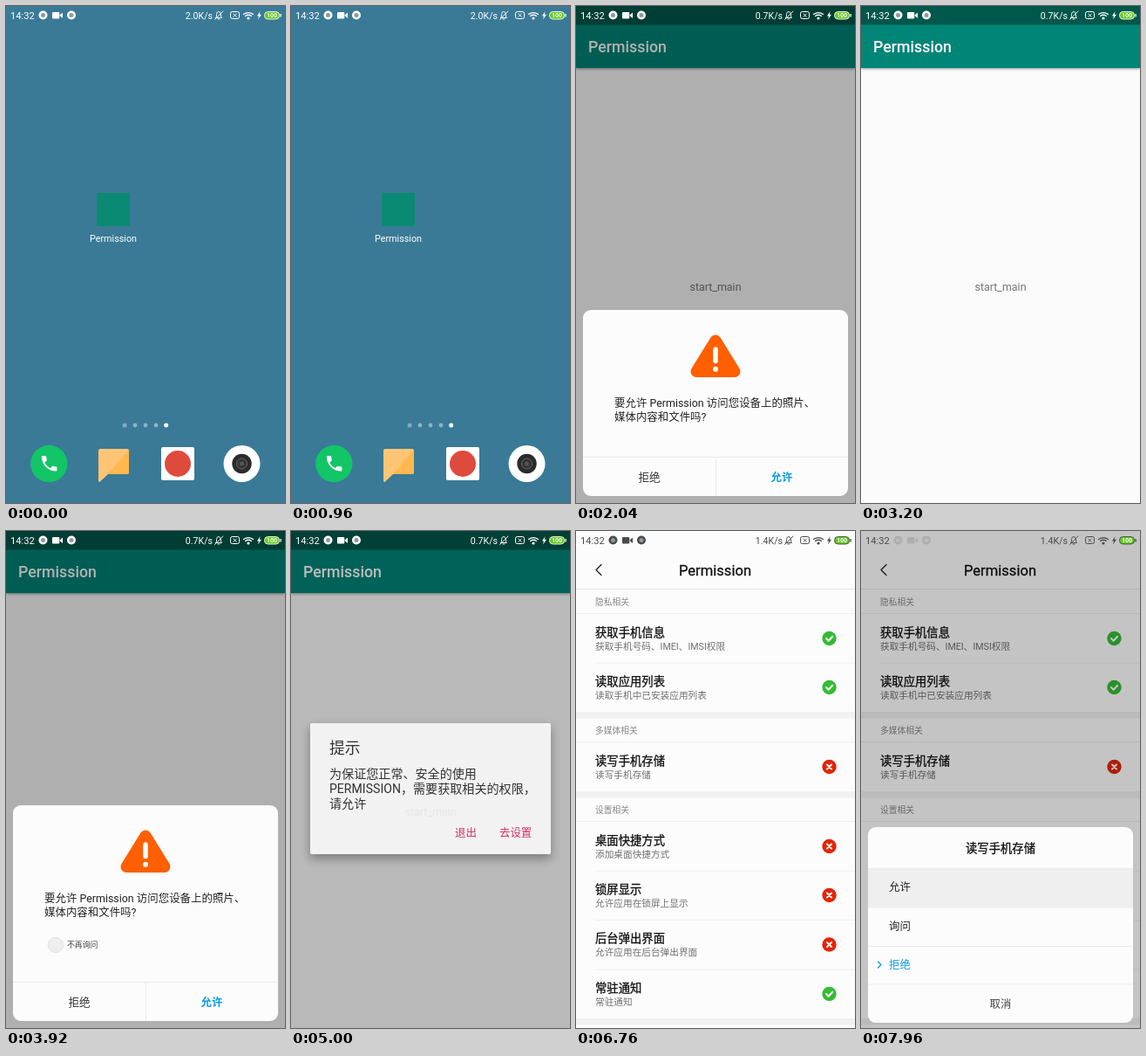
An HTML page that plays this animation: 320 by 569 pixels, repeating every 8 s.

```html
<!DOCTYPE html>
<html lang="zh-CN">
<head>
<meta charset="utf-8">
<title>Permission</title>
<style>
html, body { margin: 0; width: 100%; height: 100%; overflow: hidden; background: #3a7a97; }
svg { display: block; width: 100vw; height: 100vh; font-family: Roboto, "Noto Sans CJK SC", sans-serif; }
.shadow { filter: drop-shadow(0 5px 6px rgba(0,0,0,.38)); }
.drop { filter: drop-shadow(0 1px 1.5px rgba(0,0,0,.4)); }
.strong { stroke: #111; stroke-width: .3px; }
</style>
</head>
<body>
<svg id="stage" viewBox="0 0 320 569"></svg>
<script>
const LOOP = 8000;
const BLUE = '#0d9be6';

// y is the middle of the line
const text = (s, x, y, size, fill, extra = '') =>
  `<text x="${x}" y="${y + size * 0.36}" font-size="${size}" fill="${fill}" ${extra}>${s}</text>`;
const mid = 'text-anchor="middle"';
const medium = 'font-weight="500"';
const strong = 'class="strong"';
const rect = (x, y, w, h, fill, extra = '') =>
  `<rect x="${x}" y="${y}" width="${w}" height="${h}" fill="${fill}" ${extra}/>`;
const circle = (x, y, r, fill, extra = '') =>
  `<circle cx="${x}" cy="${y}" r="${r}" fill="${fill}" ${extra}/>`;
const path = (d, stroke, width, extra = '') =>
  `<path d="${d}" fill="none" stroke="${stroke}" stroke-width="${width}" stroke-linecap="round" stroke-linejoin="round" ${extra}/>`;
const group = (id, body) => `<g id="${id}">${body}</g>`;

function home() {
  const dots = [148, 160, 172].map(x => circle(x, 480, 2.4, '#fff', 'opacity=".42"')).join('');
  return rect(0, 0, 320, 569, '#3a7a97') +
    rect(104, 214, 38, 38, '#0b8a73', 'rx="1"') +
    text('Permission', 123, 266, 10.8, '#fff', mid) +
    rect(133.8, 477.8, 4.6, 4.6, '#fff', 'opacity=".35"') + dots + circle(183.7, 480, 2.5, '#fff') +
    circle(49.3, 524, 21.2, '#12c566') +
    '<path fill="#fff" transform="translate(38 512.2) scale(.97)" d="M6.6 10.8c1.4 2.8 3.8 5.1 6.6 6.6l2.2-2.2c.3-.3.7-.4 1-.2 1.1.4 2.3.6 3.6.6.6 0 1 .4 1 1V20c0 .6-.4 1-1 1C10.6 21 3 13.4 3 4c0-.6.5-1 1-1h3.5c.6 0 1 .4 1 1 0 1.3.2 2.5.6 3.6.1.3 0 .7-.2 1z"/>' +
    '<path fill="#ffc574" d="M108 507H139Q141 507 141 509V534Q141 536 139 536H117L107.5 545Q106 545 106 543V509Q106 507 108 507Z"/>' +
    '<path fill="#ffb84d" d="M141 508V534Q141 536 139 536H117Z"/>' +
    rect(178, 505, 38, 38, '#fff', 'rx="2"') + circle(197, 524, 15, '#de4b3d') +
    circle(270.5, 524, 21, '#fff') + circle(270.5, 524, 11.2, '#2b2b2b') +
    circle(270.5, 524, 6, '#333', 'stroke="#686868" stroke-width="1"') + circle(270.5, 524, 2.5, '#555');
}

function app() {
  return rect(0, 0, 320, 569, '#fafafa') +
    rect(0, 0, 320, 71, '#008577', 'class="drop"') +
    rect(0, 0, 320, 21.5, '#00574b') +
    text('Permission', 14, 47, 17.78, '#fff', medium) +
    text('start_main', 160, 321.5, 12.44, '#757575', mid);
}

// The system request panel; askAgain adds the tick row
function request(askAgain) {
  const top = askAgain ? 314 : 348;
  const row = askAgain
    ? circle(57, 474, 8.7, '#eeeeee', 'stroke="#dcdcdc" stroke-width=".8"') + text('不再询问', 70, 474, 8.89, '#444')
    : '';
  return rect(8, top, 304, 561 - top, '#fcfcfc', 'rx="9"') +
    `<g transform="translate(0 ${top - 348})">` +
    '<path d="M160 383L182 418.5H138Z" fill="#ff5f00" stroke="#ff5f00" stroke-width="13" stroke-linejoin="round"/>' +
    path('M160 393V406.5', '#fff', 5.5) + circle(160, 415.8, 3, '#fff') +
    text('要允许 Permission 访问您设备上的照片、', 44, 454.5, 12.44, '#222') +
    text('媒体内容和文件吗?', 44, 470.7, 12.44, '#222') + '</g>' + row +
    rect(8, 516, 304, .8, '#e6e6e6') + rect(160, 516, .8, 45, '#e6e6e6') +
    text('拒绝', 84, 539.5, 12.6, '#333', mid) +
    text('允许', 236, 539.5, 12.44, BLUE, mid + ' font-weight="700"');
}

function alertBox() {
  const pink = '#d81b60';
  return rect(22, 220, 276, 150, '#fafafa', 'rx="2" class="shadow"') +
    text('提示', 44, 249, 17.78, '#212121') +
    text('为保证您正常、安全的使用', 44, 277.5, 14.1, '#212121') +
    text('PERMISSION，需要获取相关的权限，', 44, 294.5, 14.1, '#212121') +
    text('请允许', 44, 311.5, 14.1, '#212121') +
    text('退出', 188, 346, 12.44, pink, medium) +
    text('去设置', 239, 346, 12.44, pink, medium);
}

function settings() {
  const sections = [
    ['隐私相关', 81, [['获取手机信息', '获取手机号码、IMEI、IMSI权限', 123, 1], ['读取应用列表', '读取手机中已安装应用列表', 179, 1]]],
    ['多媒体相关', 228, [['读写手机存储', '读写手机存储', 270, 0]]],
    ['设置相关', 319, [['桌面快捷方式', '添加桌面快捷方式', 361, 0], ['锁屏显示', '允许应用在锁屏上显示', 417, 0],
      ['后台弹出界面', '允许应用在后台弹出界面', 473.5, 0], ['常驻通知', '常驻通知', 530, 1]]],
  ];
  const mark = (y, on) => circle(290.5, y, 8.2, on ? '#35bb35' : '#e32407') +
    path(on ? `M287 ${y}l2.6 2.7l4.6-5` : `M288 ${y - 2.5}l5 5m0-5l-5 5`, '#fff', 2);
  let out = rect(0, 0, 320, 569, '#fcfcfc') +
    path('M29 38.5L23 44.5L29 50.5', '#222', 1.3) +
    text('Permission', 159.5, 45, 16.6, '#111', `${mid} ${strong}`) +
    rect(0, 66, 320, .8, '#e4e4e4');
  for (const [label, y, rows] of sections) {
    out += text(label, 22, y, 9.78, '#888') + rect(0, y + 13, 320, .8, '#ebebeb');
    rows.forEach(([title, sub, c, on], i) => {
      if (i) out += rect(22, c - 28.3, 298, .8, '#eeeeee');
      out += text(title, 22, c - 7, 13.33, '#111', strong) + text(sub, 22, c + 9, 10.67, '#707070') + mark(c, on);
    });
    out += rect(0, rows[rows.length - 1][2] + 28, 320, 7.5, '#f1f1f1');
  }
  return out;
}

function sheet() {
  return rect(8, 338, 304, 224, '#fcfcfc', 'rx="9"') +
    group('press', rect(8, 385, 304, 44.5, '#efefef')) +
    text('读写手机存储', 160, 362, 13.33, '#111', `${mid} ${strong}`) +
    [385, 429.5, 474, 517.5].map(y => rect(8, y, 304, .8, '#e8e8e8')).join('') +
    text('允许', 32, 407, 12.44, '#222') + text('询问', 32, 451.5, 12.44, '#222') +
    path('M19.5 492L23 495.5L19.5 499', BLUE, 1.3) +
    text('拒绝', 32, 496, 12.44, BLUE) + text('取消', 160, 541, 12.44, '#444', mid);
}

function statusBar() {
  const ink = 'currentColor';
  const lens = x => circle(x, 10.5, 5, ink) + circle(x, 10.5, 2.5, '#8c9a9e');
  const wave = r => path(`M${278 - r} ${15 - r}Q278 ${15 - r * 1.7} ${278 + r} ${15 - r}`, ink, 1.3);
  return text('14:32', 5, 11.2, 11.2, ink) +
    group('notes', lens(42.5) + lens(75) + rect(53, 7, 8.3, 7.5, ink, 'rx="1"') +
      `<path d="M61.5 10.5L65 7.5V14L61.5 11Z" fill="${ink}"/>`) +
    '<text id="speed" x="237" y="15" font-size="10.6" text-anchor="end" fill="currentColor"></text>' +
    path('M240.5 13.5H247.5L246.5 12V9.5Q246 6.5 244 6.5Q241.5 6.5 241.5 9.5V12ZM243 15H245M239.5 15.5L249 6', ink, .9) +
    rect(257.5, 6.5, 10, 8, 'none', `rx="2" stroke="${ink}"`) +
    path('M261 9l3.2 3.2m0-3.2l-3.2 3.2', ink, 1) +
    wave(5.5) + wave(3.5) + circle(278, 14, 1.6, ink) +
    `<path d="M291.5 6L288 11.5H290L289 15.5L293 9.7H290.7Z" fill="${ink}"/>` +
    rect(296.5, 6.5, 17, 8.5, '#62c81f', `rx="4" stroke="${ink}" stroke-width=".9"`) +
    rect(314.4, 9, 1.3, 3.5, ink) +
    text('100', 305, 10.9, 7, '#fff', mid + ' font-weight="700"');
}

const stage = document.getElementById('stage');
stage.innerHTML =
  `<defs><clipPath id="window">${rect(0, 0, 320, 569, '#fff', 'id="hole"')}</clipPath></defs>` +
  group('home', home()) +
  group('app', `<g clip-path="url(#window)">${app()}</g>`) +
  group('settings', settings()) +
  rect(0, 0, 320, 569, '#000', 'id="dim"') +
  group('ask1', request(false)) + group('ask2', request(true)) +
  group('alert', alertBox()) + group('sheet', sheet()) +
  group('status', statusBar());

const $ = {};
stage.querySelectorAll('[id]').forEach(el => $[el.id] = el);

const clamp = v => Math.min(1, Math.max(0, v));
const ramp = (t, start, length) => clamp((t - start) / length);
const out3 = p => 1 - (1 - p) ** 3;
const show = (el, on) => el.setAttribute('visibility', on ? 'inherit' : 'hidden');
const move = (el, x, y) => el.setAttribute('transform', `translate(${x} ${y})`);

// Start and end of each stay, with the fade lengths
const LAUNCH = 1160, OPEN = 6140;
const stays = {
  ask1: { from: 1620, to: 2760, enter: 280, leave: 220, height: 226 },
  ask2: { from: 3400, to: 4600, enter: 280, leave: 220, height: 260 },
  alert: { from: 4860, to: 6000, enter: 160, leave: 150 },
  sheet: { from: 7180, to: 7920, enter: 280, leave: 160, height: 236 },
};

function render(t) {
  const launch = out3(ramp(t, LAUNCH, 320));
  const slide = out3(ramp(t, OPEN, 360));

  show($.home, launch < 1);
  show($.app, launch > 0 && slide < 1);
  const scale = 0.12 + 0.88 * launch;
  $.app.setAttribute('transform', slide > 0
    ? `translate(${-80 * slide} 0)`
    : `translate(${104 * (1 - launch)} ${214 * (1 - launch)}) scale(${scale})`);
  $.app.setAttribute('opacity', clamp(launch * 2));
  $.hole.setAttribute('rx', 40 * (1 - launch));
  show($.settings, slide > 0);
  move($.settings, 320 * (1 - slide), 0);

  let dim = 0;
  for (const [id, s] of Object.entries(stays)) {
    const enter = ramp(t, s.from, s.enter), leave = ramp(t, s.to, s.leave);
    const level = enter * (1 - leave);
    dim = Math.max(dim, 0.3 * level);
    $[id].setAttribute('display', level > 0 ? 'inline' : 'none');
    if (s.height) {
      move($[id], 0, s.height * (1 - out3(enter) + leave ** 4));
    } else {
      const k = 0.9 + 0.1 * (1 - (1 - enter) ** 4);
      $[id].setAttribute('transform', `translate(160 295) scale(${k}) translate(-160 -295)`);
      $[id].setAttribute('opacity', level);
    }
  }
  $.dim.setAttribute('opacity', dim);
  show($.press, t >= 7840);

  const light = t >= OPEN + 60;
  $.status.setAttribute('color', light ? '#4a4a4a' : '#fff');
  $.notes.setAttribute('opacity', 1 - 0.82 * ramp(t, 7180, 280));
  $.speed.textContent = (t < 1400 ? '2.0' : t < 6000 ? '0.7' : '1.4') + 'K/s';
}

const begin = performance.now();
function tick() {
  render((performance.now() - begin) % LOOP);
  requestAnimationFrame(tick);
}
tick();
</script>
</body>
</html>
```
